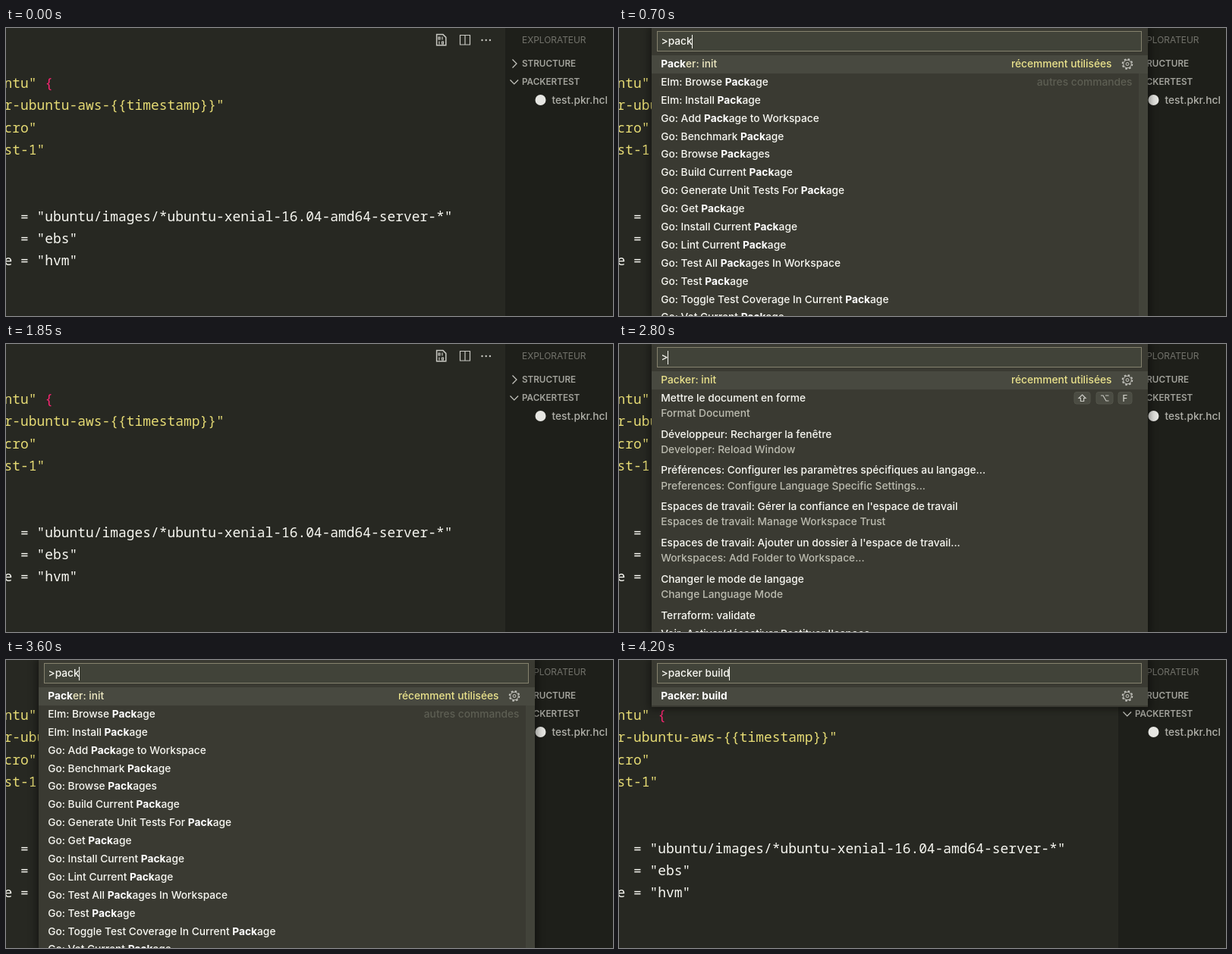
Write an HTML page that moves like this. It is 800 px wide and 380 px high and loops after 4250 ms.

```html
<!DOCTYPE html>
<html lang="fr">
<head>
<meta charset="utf-8">
<title>Palette de commandes</title>
<style>
  html, body { margin: 0; width: 100%; height: 100%; overflow: hidden; background: #272822; }
  #stage { position: relative; width: 800px; height: 380px; overflow: hidden;
    font: 500 13.75px/23.9px Inter, sans-serif; color: #f8f8f2; white-space: pre; }
  svg { position: absolute; left: 0; top: 0; }
  .code { font: 500 17.92px "Noto Sans Mono", monospace; fill: #f8f8f2; }
  .code .string { fill: #e6db74; }
  .code .brace { fill: #f92672; }
  .section { font-size: 11.7px; font-weight: 600; fill: #a3a39c; }
  .icon { fill: none; stroke: #c8c8c2; stroke-width: 1.2; }

  #palette { position: absolute; left: 42.5px; top: 0; width: 654px;
    background: #3a3a32; box-shadow: 0 0 10px 3px rgba(0, 0, 0, .42); overflow: hidden; }
  #input { position: absolute; left: 7.5px; top: 4px; width: 637px; height: 25px; line-height: 25px;
    border: 1px solid #85826e; background: #414339; text-indent: 4.5px; }
  #caret { display: inline-block; width: 1px; height: 18px; margin-left: -1px;
    background: #f8f8f2; vertical-align: -4.5px; }
  #list { position: absolute; left: 0; right: 0; top: 36px; }
  .row { position: relative; height: 23.9px; padding-left: 12.7px; }
  .row.double { height: 47.8px; }
  .row.focus { background: #484940; }
  .row b { font-weight: 700; color: #fff; }
  .detail { margin-top: -3.9px; color: #bcbcb0; }
  .recent { position: absolute; right: 47px; top: 0; color: #ebe38c; }
  .others { position: absolute; right: 20px; top: 0; color: #5d5e53; }
  .row svg { overflow: visible; }
  #track { position: absolute; right: 0; top: 36px; width: 12px; bottom: 0; background: #42433a; }
  #slider { height: 23.9px; background: #55564b; }
</style>
</head>
<body>
<div id="stage">
  <svg width="800" height="380">
    <rect x="658" width="142" height="380" fill="#1e1f1a"/>
    <g id="code" class="code"></g>
    <g class="icon">
      <path d="M567.6 8.6h8.4l3.8 3.8v10.4h-12.2z" stroke-width="1.5"/>
      <path d="M570 12h2v3h-2zM575 11.5v4M571 17.5v4M574.5 18h2v3h-2z"/>
      <path d="M598.5 9.5h13v12.5h-13zM605 9.5v12.5"/>
      <path d="M667.5 41.5l5.5 5.5-5.5 5.5M664.5 68.5l5.3 5.3 5.3-5.3"/>
    </g>
    <g fill="#c8c8c2">
      <circle cx="627.5" cy="16" r="1.2"/><circle cx="632.7" cy="16" r="1.2"/><circle cx="637.9" cy="16" r="1.2"/>
    </g>
    <text x="680" y="20.3" font-size="11.9" font-weight="400" fill="#73736c">EXPLORATEUR</text>
    <text x="680" y="51.3" class="section">STRUCTURE</text>
    <text x="680" y="75.3" class="section">PACKERTEST</text>
    <circle cx="704.5" cy="95" r="7" fill="#e6e6e2"/>
    <text x="719.5" y="100" fill="#b0b0a9">test.pkr.hcl</text>
  </svg>
  <div id="palette">
    <div id="track"><div id="slider"></div></div>
    <div id="list"></div>
    <div id="input"><span id="typed"></span><span id="caret"></span></div>
  </div>
</div>
<script>
const LOOP = 4250;
const $ = id => document.getElementById(id);

const codeLines = [
  [0, '<tspan class="string">ntu"</tspan> <tspan class="brace">{</tspan>'],
  [1, '<tspan class="string">r-ubuntu-aws-{{timestamp}}"</tspan>'],
  [2, '<tspan class="string">cro"</tspan>'],
  [3, '<tspan class="string">st-1"</tspan>'],
  [6, '  = "ubuntu/images/*ubuntu-xenial-16.04-amd64-server-*"'],
  [7, '  = "ebs"'],
  [8, 'e = "hvm"']
];
$('code').innerHTML = codeLines.map(([line, text]) =>
  `<text x="-2.4" y="${79 + 29.3 * line}" xml:space="preserve">${text}</text>`).join('');

// Commands listed before anything is typed: label, optional second line
const suggested = [
  ['Packer: init'],
  ['Mettre le document en forme', 'Format Document'],
  ['Développeur: Recharger la fenêtre', 'Developer: Reload Window'],
  ['Préférences: Configurer les paramètres spécifiques au langage...',
    'Preferences: Configure Language Specific Settings...'],
  ["Espaces de travail: Gérer la confiance en l'espace de travail",
    'Espaces de travail: Manage Workspace Trust'],
  ["Espaces de travail: Ajouter un dossier à l'espace de travail...",
    'Workspaces: Add Folder to Workspace...'],
  ['Changer le mode de langage', 'Change Language Mode'],
  ['Terraform: validate'],
  ["Voir: Activer/désactiver Restituer l'espace"]
];
const others = [
  'Elm: Browse Package', 'Elm: Install Package', 'Go: Add Package to Workspace',
  'Go: Benchmark Package', 'Go: Browse Packages', 'Go: Build Current Package',
  'Go: Generate Unit Tests For Package', 'Go: Get Package', 'Go: Install Current Package',
  'Go: Lint Current Package', 'Go: Test All Packages In Workspace', 'Go: Test Package',
  'Go: Toggle Test Coverage In Current Package', 'Go: Vet Current Package', 'Packer: build'
].map(label => [label]);

// Each session: opening and closing time, text, and the time of each keystroke
const sessions = [
  { open: 50, close: 1650, caretOff: 1200, text: 'packer init',
    keys: [400, 500, 600, 700, 750, 800, 850, 900, 950, 1050, 1100] },
  { open: 2800, close: LOOP, caretOff: LOOP, text: 'packer build',
    keys: [2950, 3400, 3500, 3600, 3650, 3700, 3750, 3850, 3900, 3950, 4150, 4200] }
];

const gear = `<svg class="icon" width="1" height="1">
  <circle cx="627" cy="11.5" r="6.5" stroke-width="1.6" stroke-dasharray="2.5 2.6"/>
  <circle cx="627" cy="11.5" r="5.3" stroke-width="1"/>
  <circle cx="627" cy="11.5" r="1.9" stroke-width="1"/></svg>`;

const keyCap = (x, w) =>
  `<rect x="${x}" y="3.5" width="${w}" height="15.5" rx="3" fill="#4b4c43" stroke="#53544a"/>`;
const shortcut = `<svg width="1" height="1">${keyCap(557, 21)}${keyCap(586, 22)}${keyCap(615, 18)}
  <path class="icon" d="M567.5 7l4.5 4.5h-2.4v4h-4.2v-4h-2.4zM592 8h3l4 7h3.5M598 8h4.5"/>
  <text x="620.5" y="15.5" font-size="11.5" fill="#d0d0c8">F</text></svg>`;

function matcher(query) {
  return new RegExp('(^|[\\s\'])(' + query.replace(' ', ':? ') + ')', 'i');
}

function rowHtml([label, detail], index, query) {
  const marked = query ? label.replace(matcher(query), '$1<b>$2</b>') : label;
  const recent = label === 'Packer: init';
  const color = recent ? (query ? '#f0ebc4' : '#ebe38c') : '#f8f8f2';
  return `<div class="row${detail ? ' double' : ''}${index ? '' : ' focus'}">` +
    `<span style="color:${color}">${marked}</span>` +
    (detail ? `<div class="detail">${detail}</div>` : '') +
    (recent ? '<span class="recent">récemment utilisées</span>' : '') +
    (query && index === 1 ? '<span class="others">autres commandes</span>' : '') +
    (index ? '' : gear) +
    (detail === 'Format Document' ? shortcut : '') + '</div>';
}

let shownQuery = null;
function showQuery(query) {
  if (query === shownQuery) return;
  shownQuery = query;
  const rows = query
    ? [...suggested, ...others].filter(([label]) => matcher(query).test(label))
    : suggested;
  $('list').innerHTML = rows.map((row, i) => rowHtml(row, i, query)).join('');
  $('typed').textContent = '>' + query;
  $('palette').style.height = Math.min(380, 38.1 + 23.9 * (query ? rows.length : 15)) + 'px';
  $('track').style.display = query && !query.startsWith('packer bui') ? 'block' : 'none';
}

function render(time) {
  const session = sessions.find(s => time >= s.open && time < s.close);
  $('palette').style.display = session ? 'block' : 'none';
  if (!session) return;
  showQuery(session.text.slice(0, session.keys.filter(key => key <= time).length));
  $('caret').style.visibility = time < session.caretOff ? 'visible' : 'hidden';
}

const start = performance.now();
function tick() {
  render((performance.now() - start) % LOOP);
  requestAnimationFrame(tick);
}
tick();
</script>
</body>
</html>
```
